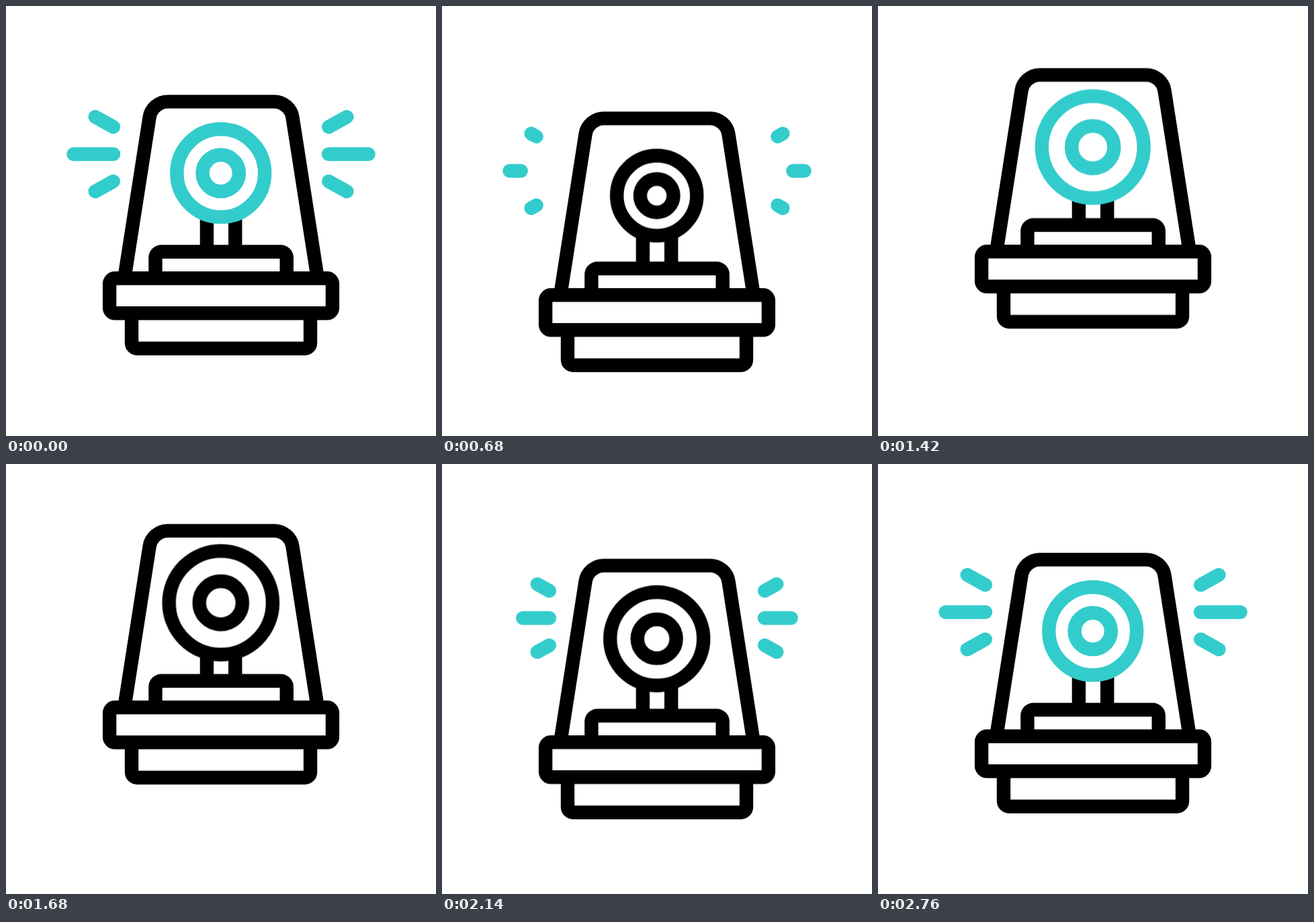
Write an HTML page without scripts that moves like this. It is 640 by 640 pixels and loops after 2840 ms.

```html
<!DOCTYPE html>
<html lang="en">
<head>
<meta charset="utf-8">
<title>Siren</title>
<style>
  html, body { margin: 0; width: 100%; height: 100%; overflow: hidden; background: #fff; }
  svg { display: block; width: 640px; height: 640px; fill: none; stroke: #000; stroke-width: 20.4; }

  .siren, .lamp, .disc, .rays path { animation: 2840ms linear infinite; }
  .siren { animation-name: hop; }
  .lamp { animation-name: sway, blink; animation-timing-function: linear, step-end; stroke: #3cc; }
  .disc { animation-name: swell; transform-origin: 319.7px 248.7px; }
  .disc circle { vector-effect: non-scaling-stroke; }
  .rays path { animation-name: flash; stroke: #3cc; stroke-linecap: round; stroke-dasharray: 1 2; }

  /* Crouch, slow float, drop, rebound, settle */
  @keyframes hop {
    0%, 7.042% { transform: translateY(0); animation-timing-function: cubic-bezier(.33, 0, .55, 1); }
    16.901% { transform: translateY(58.5px); animation-timing-function: cubic-bezier(.14, 0, .16, 1); }
    60.563% { transform: translateY(-43px); animation-timing-function: cubic-bezier(.333, 0, .667, 1); }
    70.423% { transform: translateY(32px); animation-timing-function: cubic-bezier(.333, 0, .667, 1); }
    80.282% { transform: translateY(-14px); animation-timing-function: cubic-bezier(.333, 0, .667, 1); }
    97.183%, 100% { transform: translateY(0); }
  }
  @keyframes sway {
    0%, 7.042% { transform: translateY(0); animation-timing-function: cubic-bezier(.33, 0, .55, 1); }
    16.901% { transform: translateY(11.6px); animation-timing-function: cubic-bezier(.17, 0, .2, 1); }
    60.563% { transform: translateY(.8px); animation-timing-function: cubic-bezier(.333, 0, .667, 1); }
    70.423% { transform: translateY(9.5px); animation-timing-function: cubic-bezier(.333, 0, .667, 1); }
    80.282% { transform: translateY(-4px); animation-timing-function: cubic-bezier(.333, 0, .667, 1); }
    97.183%, 100% { transform: translateY(0); }
  }
  @keyframes swell {
    0%, 7.042% { transform: scale(1); animation-timing-function: cubic-bezier(.33, 0, .55, 1); }
    16.901% { transform: scale(.903); animation-timing-function: cubic-bezier(.63, 0, .37, 1); }
    60.563% { transform: scale(1.18); animation-timing-function: cubic-bezier(.333, 0, .667, 1); }
    70.423% { transform: scale(1.05); animation-timing-function: cubic-bezier(.333, 0, .667, 1); }
    80.282% { transform: scale(1.076); animation-timing-function: cubic-bezier(.333, 0, .667, 1); }
    97.183%, 100% { transform: scale(1); }
  }
  @keyframes blink {
    0%, 41.549%, 76.056%, 100% { stroke: #3cc; }
    23.944%, 59.155% { stroke: #000; }
  }
  /* Rays retreat to their outer tips, then shoot out again from the dome */
  @keyframes flash {
    0%, 7.042% { stroke-dashoffset: 0; opacity: 1; animation-timing-function: cubic-bezier(.57, 0, .05, 1); }
    46.479% { stroke-dashoffset: 1; opacity: 1; }
    46.48%, 67.605% { stroke-dashoffset: -1; opacity: 0; }
    67.606% { stroke-dashoffset: -1; opacity: 1; animation-timing-function: cubic-bezier(.333, 0, .667, 1); }
    80.282%, 100% { stroke-dashoffset: 0; opacity: 1; }
  }
</style>
</head>
<body>
<svg viewBox="0 0 640 640">
  <g class="siren">
    <g class="rays">
      <path pathLength="1" d="M132.7 165L159.8 180"/>
      <path pathLength="1" d="M100.5 220.5H160"/>
      <path pathLength="1" d="M132.7 276L159.8 261"/>
    </g>
    <g class="rays" transform="matrix(-1 0 0 1 640 0)">
      <path pathLength="1" d="M132.7 165L159.8 180"/>
      <path pathLength="1" d="M100.5 220.5H160"/>
      <path pathLength="1" d="M132.7 276L159.8 261"/>
    </g>
    <path d="M177 400L213.5 166A27.8 27.8 0 0 1 241 142.4H399A27.8 27.8 0 0 1 426.5 166L463 400"/>
    <path d="M298.9 305V362M341.2 305V362"/>
    <path d="M222.4 405V374.7a9 9 0 0 1 9-9H408.7a9 9 0 0 1 9 9V405"/>
    <path d="M187 458V501.7a8 8 0 0 0 8 8H445a8 8 0 0 0 8-8V458"/>
    <rect x="154.1" y="405.3" width="331.8" height="52" rx="8"/>
    <g class="lamp">
      <g class="disc">
        <circle cx="319.7" cy="248.7" r="65.4" fill="#fff"/>
        <circle cx="319.7" cy="248.7" r="27.2"/>
      </g>
    </g>
  </g>
</svg>
</body>
</html>
```
